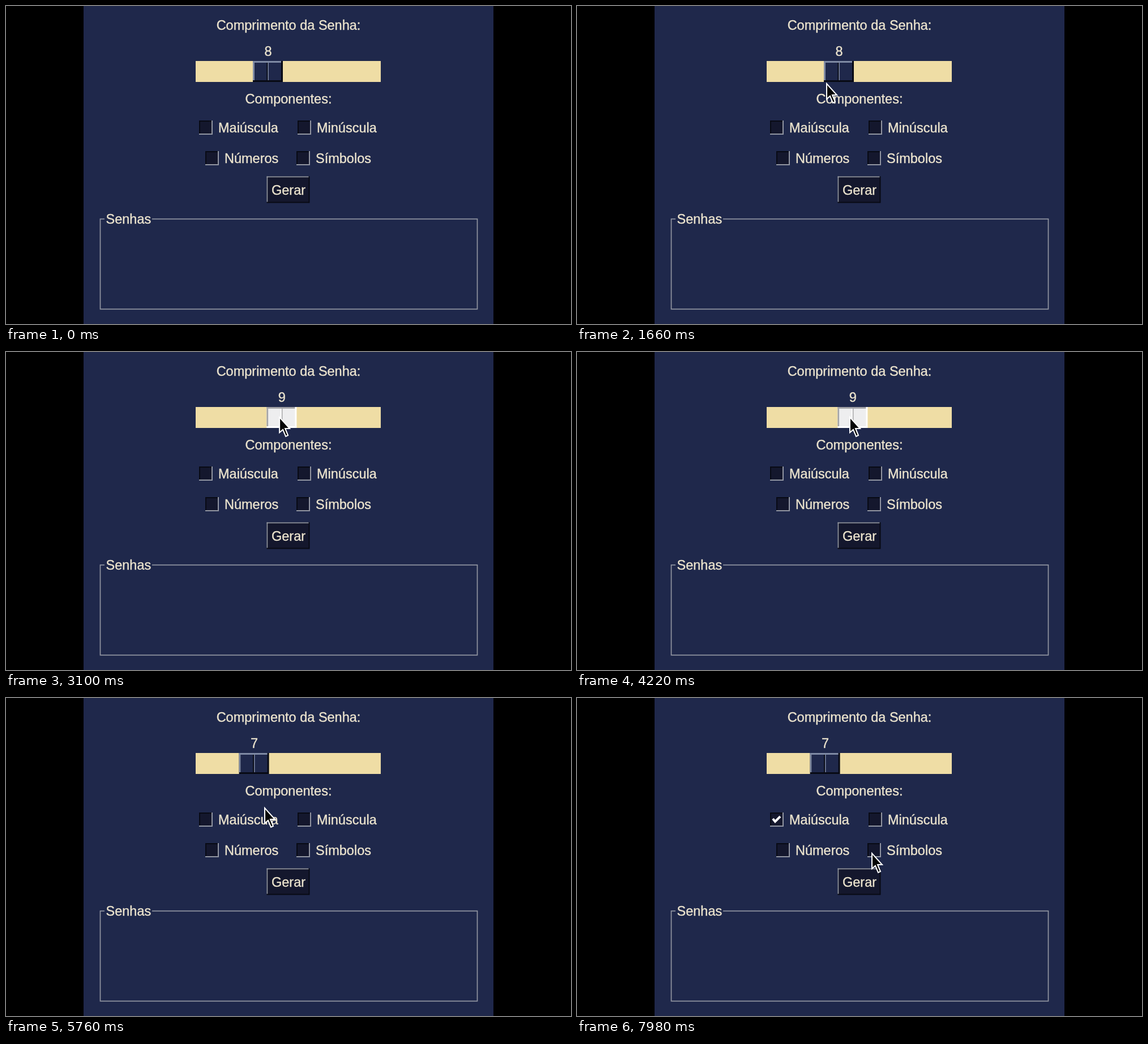
An HTML page with a canvas for the animation above (8000 ms loop, 998 px wide and 561 px high).

```html
<!DOCTYPE html>
<html lang="pt">
<head>
<meta charset="utf-8">
<title>Gerador de senhas</title>
<style>
  html, body { margin: 0; width: 100%; height: 100%; overflow: hidden; background: #000; }
  canvas { display: block; }
</style>
</head>
<body>
<canvas id="stage" width="998" height="561"></canvas>
<script>
const ctx = document.getElementById('stage').getContext('2d');
const LOOP = 8000, GRAB = 2000, SWEEP = 1110, RELEASE = GRAB + 3 * SWEEP;
const CLICK = 7000, CHECKED = 7250;
const NAVY = '#1f284b', DARK = '#14172d', BLACK = '#080a14', CREAM = '#ece4ce', EDGE = '#9296a2';
const CENTER = 499;

// Places the pointer glides between
const stops = [
  { t: 800, x: 136, y: 504 },
  { t: 1660, x: 441, y: 137 },
  { t: GRAB, x: 484, y: 115 },
  { t: GRAB + 2 * SWEEP, x: 482, y: 115 },
  { t: RELEASE, x: 437, y: 115 },
  { t: 5760, x: 457, y: 194 },
  { t: 7120, x: 404, y: 221 },
  { t: 7980, x: 521, y: 274 }
];

const ease = u => u * u * (3 - 2 * u);
const isDragging = t => t >= GRAB && t < RELEASE;

function pointerAt(t) {
  const next = stops.findIndex(stop => stop.t > t);
  if (next === 0) return null;
  if (next < 0) return stops[stops.length - 1];
  const a = stops[next - 1], b = stops[next];
  const k = ease((t - a.t) / (b.t - a.t));
  const sweep = isDragging(t) ? 78 * (1 - Math.cos(2 * Math.PI * (t - GRAB) / SWEEP)) : 0;
  return { x: a.x + (b.x - a.x) * k + sweep, y: a.y + (b.y - a.y) * k };
}

function valueAt(t, pointer) {
  if (t < GRAB) return 8;
  if (t >= RELEASE) return 7;
  return Math.min(15, 8 + Math.round((pointer.x - 461) / 24.4));
}

function rect(x, y, w, h, color) {
  ctx.fillStyle = color;
  ctx.fillRect(x, y, w, h);
}

function text(str, x, baseline, align = 'center') {
  ctx.fillStyle = ctx.strokeStyle = CREAM;
  ctx.lineWidth = 0.4;
  ctx.textAlign = align;
  ctx.fillText(str, x, baseline);
  ctx.strokeText(str, x, baseline);
}

function bevel(x, y, w, h, face, topLeft, bottomRight, size = 2) {
  rect(x, y, w, h, bottomRight);
  rect(x, y, w - size, size, topLeft);
  rect(x, y, size, h - size, topLeft);
  rect(x + size, y + size, w - 2 * size, h - 2 * size, face);
}

function drawSlider(value, dragging) {
  const x = 436 + 24.4 * (value - 8), y = 97, w = 53, h = 37;
  const [face, topLeft, bottomRight] = dragging
    ? ['#eeeeef', '#a3a3a6', '#fff']
    : [NAVY, '#7f8aa4', BLACK];
  text(value, x + w / 2 + 0.5, 88);
  rect(335, y, 327, h, '#efdda5');
  bevel(x, y, w, h, face, topLeft, bottomRight, 3);
  rect(x + 24.5, y + 3, 2, h - 6, bottomRight);
  rect(x + 26.5, y + 3, 1.5, h - 6, topLeft);
}

function drawCheckbox(label, x, y, active, checked) {
  bevel(x, y, 24, 25, active ? NAVY : DARK, BLACK, EDGE);
  text(label, x + 34, y + 21, 'left');
  if (!checked) return;
  ctx.beginPath();
  ctx.moveTo(x + 5, y + 11);
  ctx.lineTo(x + 9, y + 16);
  ctx.lineTo(x + 18, y + 7);
  ctx.strokeStyle = '#fff';
  ctx.lineWidth = 4;
  ctx.stroke();
}

function drawGroup() {
  ctx.strokeStyle = EDGE;
  ctx.lineWidth = 1.7;
  ctx.strokeRect(166.5, 375.7, 666, 159);
  rect(174, 370, 84, 10, NAVY);
  text('Senhas', 176.5, 384, 'left');
}

function drawPointer({ x, y }) {
  ctx.save();
  ctx.beginPath();
  ctx.rect(137, 0, 724, 561);
  ctx.clip();
  ctx.translate(x, y);
  const arrow = new Path2D('M0 0V27L6 22L11 34L15 32L10 20H18Z');
  ctx.fillStyle = '#050505';
  ctx.fill(arrow);
  ctx.strokeStyle = '#fff';
  ctx.lineWidth = 2;
  ctx.stroke(arrow);
  ctx.restore();
}

function draw(t) {
  const pointer = pointerAt(t);
  ctx.font = '23.5px "Liberation Sans", Arial, sans-serif';
  rect(0, 0, 998, 561, '#000');
  rect(137, 0, 724, 561, NAVY);

  text('Comprimento da Senha:', CENTER, 42);
  drawSlider(valueAt(t, pointer), isDragging(t));

  text('Componentes:', CENTER, 172);
  drawCheckbox('Maiúscula', 341, 202, t >= CLICK && t < CHECKED, t >= CHECKED);
  drawCheckbox('Minúscula', 515, 202);
  drawCheckbox('Números', 352, 256);
  drawCheckbox('Símbolos', 513, 256);

  bevel(460.5, 300.5, 76, 47, DARK, EDGE, BLACK);
  text('Gerar', CENTER, 333);
  drawGroup();
  if (pointer) drawPointer(pointer);
}

const start = performance.now();
function frame() {
  draw((performance.now() - start) % LOOP);
  requestAnimationFrame(frame);
}
frame();
</script>
</body>
</html>
```
